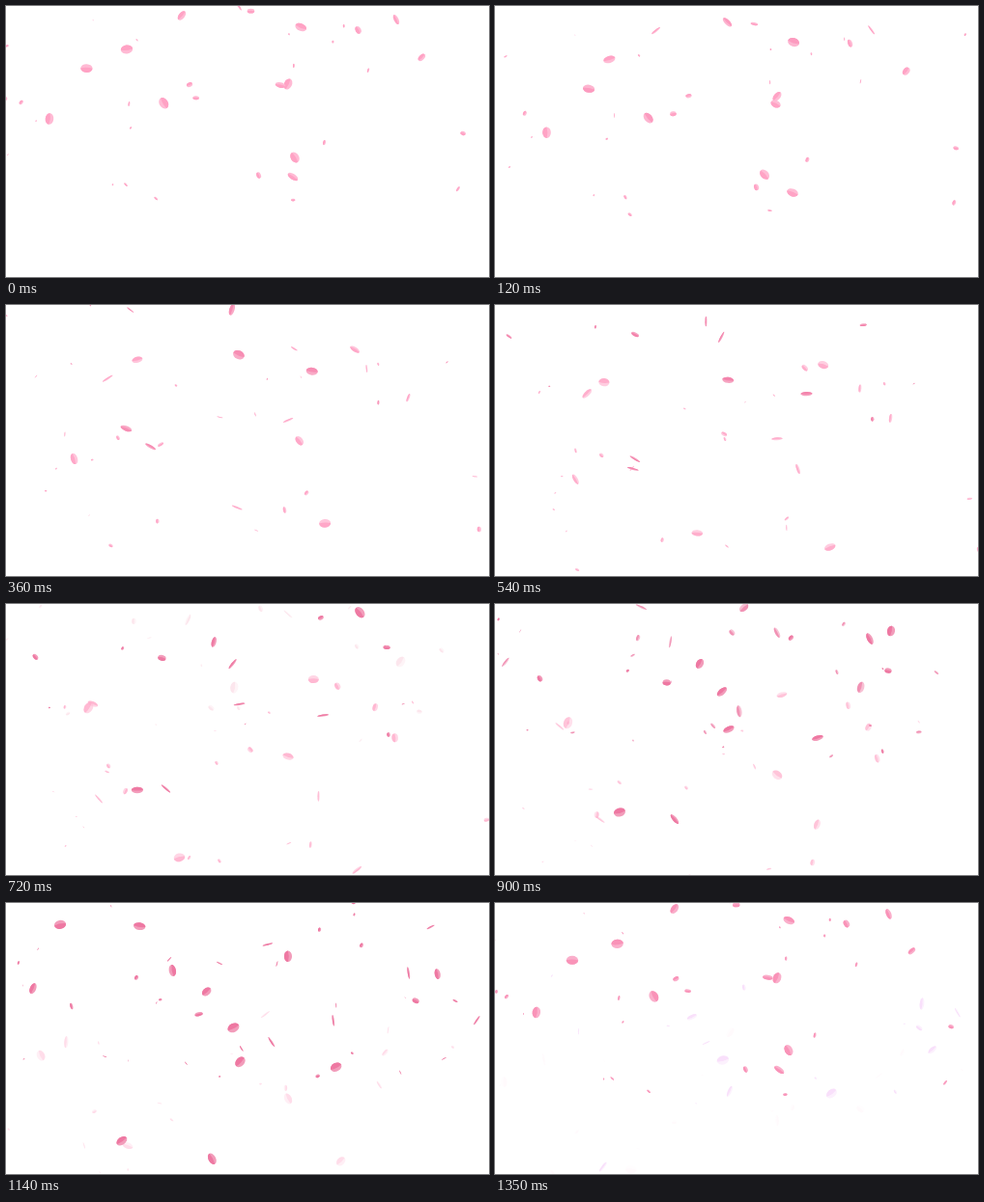
Recreate the animation shown at these times as an HTML page with a canvas. Size 500 px wide and 281 px high, loop 1.38 s.

```html
<!DOCTYPE html>
<html lang="en">
<head>
<meta charset="utf-8">
<title>Falling petals</title>
<style>
html, body { margin: 0; width: 100%; height: 100%; overflow: hidden; background: #fff; }
canvas { display: block; width: 500px; height: 281px; }
</style>
</head>
<body>
<canvas id="stage" width="500" height="281"></canvas>
<script>
const LOOP = 1380, STEP = 30, WIDTH = 500, HEIGHT = 281;
const PALE = [255, 174, 204], DEEP = [240, 138, 174], LILAC = [225, 130, 245];
const ctx = document.getElementById('stage').getContext('2d');

let seed = 11;
const rand = () => (seed = seed * 16807 % 2147483647) / 2147483647;
const between = (a, b) => a + (b - a) * rand();
const spin = (a, b) => between(a, b) * (rand() < .5 ? -1 : 1);
const clamp = v => Math.min(1, Math.max(0, v));
const mix = (a, b, k) => a.map((v, i) => v + (b[i] - v) * k);

// Early petals pale away over the loop; late ones deepen, then vanish at its end.
const early = { ref: 0, spread: 1.4, reach: 215,
  alpha: t => 1 - (t / LOOP) ** 1.4,
  color: () => PALE };
const late = { ref: 900, spread: 1, reach: 165,
  alpha: t => clamp((LOOP - t) / 230),
  color: t => mix(mix(PALE, DEEP, clamp(t / 750)), LILAC, 1 - late.alpha(t)) };

function petal(kind, x, y, vx, vy, size) {
  return { kind, x, y, vx, vy, size,
    angle: between(0, Math.PI), turn: spin(.5, 2),
    phase: spin(0, 1.1), flap: spin(2, 5) };
}

function scatter(kind, count) {
  return Array.from({ length: count }, () => petal(kind,
    WIDTH * rand() ** kind.spread, kind.reach * rand(),
    spin(20, 130), between(90, 150), 1 + 3.4 * rand() ** 1.5));
}

// The largest petals: x, y, drift and fall in px/s
const leads = (kind, list) =>
  list.map(p => petal(kind, ...p, between(5.3, 6.5)));

const petals = [
  ...scatter(early, 24),
  ...scatter(late, 11),
  ...leads(early, [
    [182, 10, -128, 130], [292, 81, 0, 107], [284, 82, 55, 163],
    [404, 14, -119, 89], [125, 45, -55, 87], [45, 117, 71, 118],
    [297, 177, 92, 137], [299, 157, -166, 147]
  ]),
  ...leads(late, [
    [242, 130, 2, 145], [334, 139, 32, 130], [235, 91, 2, 160],
    [212, 62, -18, 125], [186, 223, 114, 176], [129, 216, -38, 128],
    [388, 36, 120, 152], [410, 28, 153, 190], [527, 87, -165, 145]
  ])
];

// Before its loop begins, every petal fades in deep and brightens.
const alphaAt = (kind, t) => t < 0 ? clamp((t + 700) / 350) : kind.alpha(t);
const colorAt = (kind, t) =>
  t < 0 ? mix(PALE, DEEP, Math.sqrt(clamp(-t / 240))) : kind.color(t);
const shade = (rgb, k) =>
  `rgb(${rgb.map(c => Math.max(0, Math.round(255 - (255 - c) * k))).join()})`;

function drawPetal(p, t) {
  const alpha = alphaAt(p.kind, t);
  if (alpha <= 0) return;
  const s = (t - p.kind.ref) / 1000;
  const rgb = colorAt(p.kind, t);
  const w = p.size * Math.max(.17, .75 * Math.abs(Math.cos(p.phase + p.flap * s)));
  ctx.save();
  ctx.globalAlpha = alpha;
  ctx.translate(p.x + p.vx * s, p.y + p.vy * s);
  ctx.rotate(p.angle + p.turn * s);
  ctx.fillStyle = shade(rgb, .85);
  ctx.beginPath();
  ctx.ellipse(0, 0, p.size, w, 0, 0, 2 * Math.PI);
  ctx.fill();
  // folded half
  ctx.fillStyle = shade(rgb, 1.15);
  ctx.beginPath();
  ctx.ellipse(0, 0, p.size, w, 0, 0, Math.PI);
  ctx.quadraticCurveTo(0, -w * .4, p.size, 0);
  ctx.fill();
  ctx.restore();
}

function draw(now) {
  const t = Math.floor(now % LOOP / STEP) * STEP;
  ctx.clearRect(0, 0, WIDTH, HEIGHT);
  for (const p of petals) {
    drawPetal(p, t);
    drawPetal(p, t - LOOP);
  }
}

const start = performance.now();
function tick() {
  draw(performance.now() - start);
  requestAnimationFrame(tick);
}
tick();
</script>
</body>
</html>
```
